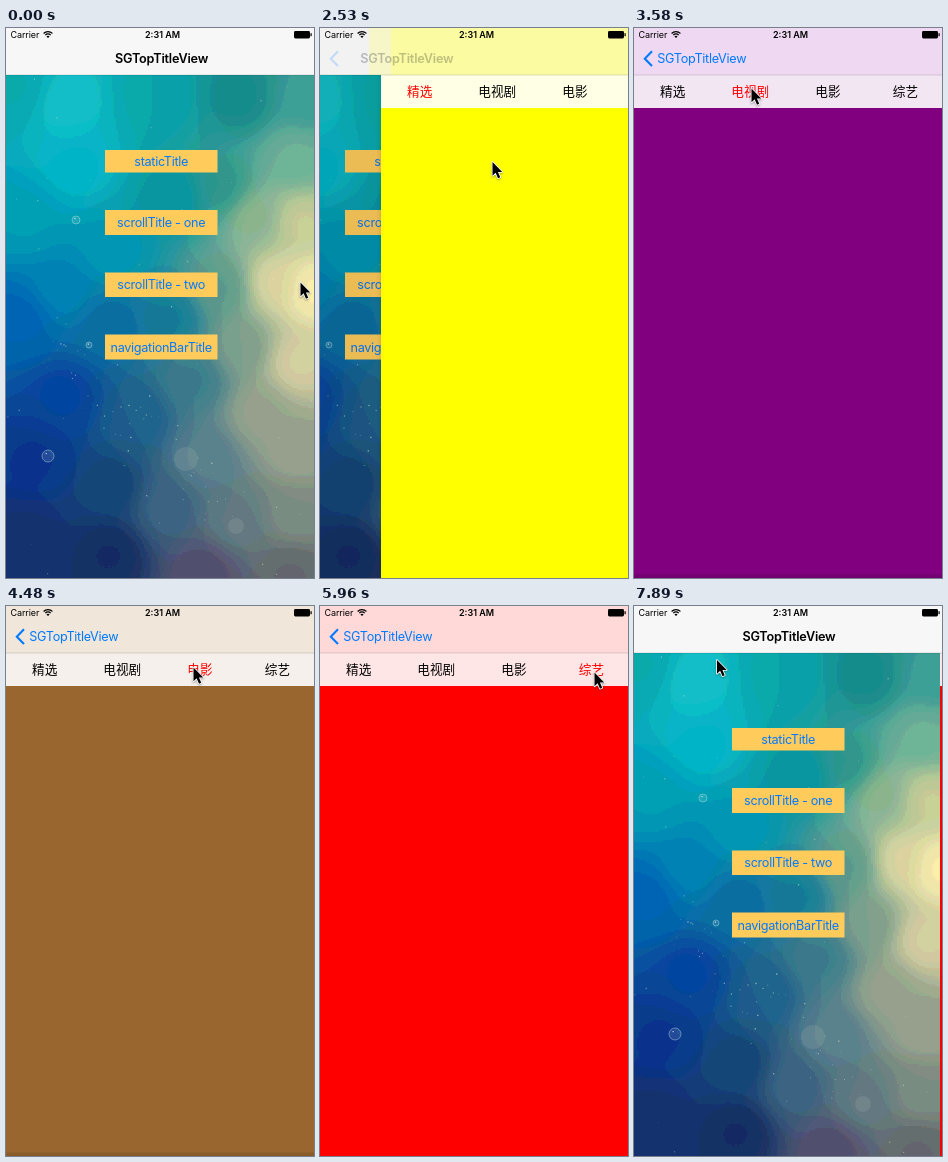
Write an HTML page with a canvas that moves like this. It is 308 px wide and 550 px high and loops after 8000 ms.

```html
<!DOCTYPE html>
<html lang="zh">
<head>
<meta charset="utf-8">
<title>SGTopTitleView</title>
<style>
html, body { margin: 0; width: 308px; height: 550px; overflow: hidden; background: #fff; }
canvas { display: block; width: 308px; height: 550px; }
</style>
</head>
<body>
<canvas id="stage"></canvas>
<script>
const W = 308, H = 550, LOOP = 8000, BAR = 47, TABS = 80;
const SANS = 'Inter, Roboto, sans-serif';
const CJK = '"Noto Sans CJK SC", "Noto Sans CJK", sans-serif';
const BLUE = '#007aff';
const dpr = window.devicePixelRatio || 1;

const clamp = v => Math.max(0, Math.min(1, v));
const mix = (a, b, p) => a + (b - a) * p;
const smooth = p => p * p * (3 - 2 * p);

function makeCanvas(el) {
  el.width = W * dpr;
  el.height = H * dpr;
  const c = el.getContext('2d');
  c.scale(dpr, dpr);
  return c;
}
const g = makeCanvas(document.getElementById('stage'));

const bursts = [
  [0, 0, 1], [1350, 2090, 6], [2380, 3280, 7], [3580, 4480, 7],
  [4770, 5510, 6], [5960, 5960, 1], [6560, 7150, 5], [7590, 7890, 3]
];
function snap(t) {
  let s = 0;
  for (const [from, to, n] of bursts) {
    if (t < from) break;
    const gap = n > 1 ? (to - from) / (n - 1) : 1;
    s = from + Math.min(n - 1, Math.floor((t - from + 2) / gap)) * gap;
  }
  return s;
}

// Pointer moves: start, end, target x, target y, dip.
const moves = [
  [1200, 2090, 172.5, 134, 0],
  [2530, 3280, 117.5, 60.5, 0],
  [3580, 4330, 187.5, 61.5, 0],
  [4620, 5510, 274.5, 66.5, 9],
  [6410, 7150, 41, 29, 0],
  [7590, 7890, 83, 54, 0]
];
function pointerAt(t) {
  let x = 294.5, y = 254.5;
  for (const [a, b, tx, ty, dip] of moves) {
    const p = smooth(clamp((t - a) / (b - a)));
    x = mix(x, tx, p);
    y = mix(y, ty, p) + dip * Math.sin(Math.PI * p);
  }
  return [x, y];
}

const pages = [
  { from: 0, fill: '#ffff00', bar: '#fbfba2', tab: 0 },
  { from: 3580, fill: '#800080', bar: '#efd9f2', tab: 1 },
  { from: 4480, fill: '#99662f', bar: '#f0e6da', tab: 2 },
  { from: 5960, fill: '#ff0000', bar: '#ffd9d8', tab: 3 }
];
const tabs = ['精选', '电视剧', '电影', '综艺'];
const buttons = [
  ['staticTitle', 122, 22.5], ['scrollTitle - one', 182, 25],
  ['scrollTitle - two', 244.5, 24.5], ['navigationBarTitle', 306.5, 25]
];

// Critically damped slide, as used by the navigation controller.
function slide(ms) {
  const k = 0.0195 * Math.max(0, ms);
  return 1 - (1 + k) * Math.exp(-k);
}
const PUSH = 2376, POP = 7524;

function text(c, str, x, y, font, color, align = 'left', track = 0) {
  c.font = font;
  c.fillStyle = color;
  c.textAlign = align;
  c.letterSpacing = track + 'px';
  c.fillText(str, x, y);
}

function random(seed) {
  return () => (seed = (seed * 16807) % 2147483647) / 2147483647;
}

// Wallpaper colours at a few points; everything between is blended.
const hues = [
  [10, 60, '#08a5ae'], [60, 75, '#12c0c8'], [70, 135, '#04b8c8'], [150, 70, '#06a5ac'],
  [235, 70, '#168c8e'], [300, 70, '#3a9c92'], [20, 190, '#009cb8'], [110, 220, '#009ab2'],
  [170, 170, '#04989f'], [215, 160, '#2c988e'], [290, 130, '#6cb094'], [250, 190, '#8db490'],
  [295, 195, '#c8ce9a'], [305, 262, '#faeeb0'], [270, 255, '#dcd69e'], [215, 260, '#5c9a8c'],
  [55, 260, '#0084b2'], [15, 290, '#0064b0'], [105, 300, '#0a6ca2'], [165, 290, '#147c98'],
  [235, 320, '#7d9e8a'], [292, 335, '#d8cfa0'], [255, 385, '#96a48c'], [190, 350, '#3c7c8c'],
  [60, 370, '#04449c'], [130, 390, '#1a5f88'], [30, 430, '#05368f'], [105, 460, '#124478'],
  [200, 430, '#587f8c'], [290, 420, '#98a28a'], [160, 480, '#3a6480'], [230, 495, '#607c80'],
  [290, 490, '#7d8c80'], [20, 510, '#143070'], [105, 525, '#142c62'], [200, 542, '#544f70'],
  [285, 542, '#62686c']
].map(([x, y, hex]) => [x, y, [1, 3, 5].map(i => parseInt(hex.slice(i, i + 2), 16))]);

function hueAt(x, y) {
  const sum = [0, 0, 0];
  let total = 0;
  for (const [hx, hy, rgb] of hues) {
    const d = (x - hx) ** 2 + (y - hy) ** 2;
    const w = 1 / (d + 350) ** 2;
    total += w;
    for (let i = 0; i < 3; i++) sum[i] += rgb[i] * w;
  }
  return sum.map(v => Math.round(v / total / 10) * 10);
}

function makeWallpaper() {
  const el = document.createElement('canvas');
  const c = makeCanvas(el);
  for (let y = BAR - 1; y < H; y += 2)
    for (let x = 0; x < W; x += 2) {
      c.fillStyle = `rgb(${hueAt(x + 1, y + 1)})`;
      c.fillRect(x, y, 2, 2);
    }

  const rnd = random(417);
  for (let i = 0; i < 110; i++) {
    const u = rnd(), v = rnd(), band = i < 55;
    const x = band ? 40 + u * 190 : u * W;
    const y = band ? 310 + u * 170 + (v - 0.5) * 80 : 50 + v * 500;
    const s = 0.6 + rnd() * 0.8;
    c.fillStyle = `rgba(225,235,205,${0.2 + rnd() * 0.45})`;
    c.fillRect(x, y, s, s);
  }
  for (const [x, y, r] of [[70, 192, 4], [83, 317, 3], [42, 428, 6]]) {
    c.beginPath();
    c.arc(x, y, r, 0, 7);
    c.fillStyle = 'rgba(190,225,235,.14)';
    c.fill();
    c.strokeStyle = 'rgba(190,220,225,.5)';
    c.lineWidth = 0.9;
    c.stroke();
    c.fillStyle = 'rgba(255,255,255,.75)';
    c.fillRect(x - r * 0.4, y - r * 0.5, 1.2, 1.2);
  }
  for (const [x, y, r] of [[180, 431, 12], [230, 498, 8]]) {
    c.beginPath();
    c.arc(x, y, r, 0, 7);
    c.fillStyle = 'rgba(160,180,170,.2)';
    c.fill();
  }
  return el;
}
const wallpaper = makeWallpaper();

function drawHome(p) {
  g.save();
  g.translate(-Math.round(0.3 * W * p), 0);
  g.drawImage(wallpaper, 0, 0, W, H);
  for (const [label, y, h] of buttons) {
    g.fillStyle = '#ffcb5b';
    g.fillRect(99, y, 112.5, h);
    text(g, label, 155.2, y + h / 2 + 4.6, '12.65px ' + SANS, BLUE, 'center', -0.3);
  }
  g.restore();
  g.fillStyle = `rgba(0,0,0,${0.1 * p})`;
  g.fillRect(0, 0, W, H);
}

function drawPage(page, x, p) {
  if (x > 0) {
    const shadow = g.createLinearGradient(x - 5, 0, x, 0);
    shadow.addColorStop(0, 'rgba(0,0,0,0)');
    shadow.addColorStop(1, `rgba(0,0,0,${0.08 * p})`);
    g.fillStyle = shadow;
    g.fillRect(x - 5, BAR, 5, H);
  }
  g.fillStyle = page.fill;
  g.fillRect(x, 0, W, H);
  if (page.tab === 1 || page.tab === 2) {
    g.fillStyle = 'rgba(0,0,0,.1)';
    g.fillRect(x, H - 3.5, W, 4);
  }
  g.fillStyle = 'rgba(255,255,255,.9)';
  g.fillRect(x, BAR, W, TABS - BAR);
  tabs.forEach((name, i) => text(g, name, x + 38.7 + 77.6 * i, 68, '12.65px ' + CJK,
    i === page.tab ? '#ff0000' : '#000', 'center'));
}

function drawBar(page, x, p, fade) {
  const shade = Math.round(247 - 6 * p);
  g.fillStyle = `rgb(${shade},${shade},${shade})`;
  g.fillRect(0, 0, W, BAR);
  g.fillStyle = page.bar;
  if (x <= 0) g.fillRect(0, 0, W, BAR);
  else if (p > 0.01) {
    // The blurred page edge shows as one half-tone band.
    g.globalAlpha = 0.5;
    g.fillRect(x - 12, 0, 22, BAR);
    g.globalAlpha = 1;
    g.fillRect(x + 10, 0, W, BAR);
  }
  g.fillStyle = 'rgba(0,0,0,.22)';
  g.fillRect(0, BAR - 0.3, W, 0.6);

  const tx = mix(109, 23.3, p);
  if (fade.title > 0) {
    g.globalAlpha = fade.title;
    text(g, 'SGTopTitleView', tx, 35, '600 12.65px ' + SANS, '#000', 'left', -0.2);
  }
  if (fade.back > 0) {
    g.globalAlpha = fade.back;
    text(g, 'SGTopTitleView', tx, 35, '12.65px ' + SANS, BLUE, 'left', -0.3);
  }
  if (fade.arrow > 0) {
    g.globalAlpha = fade.arrow;
    g.strokeStyle = BLUE;
    g.lineWidth = 2.1;
    g.beginPath();
    g.moveTo(18, 23.3);
    g.lineTo(10.8, 30.7);
    g.lineTo(18, 38.1);
    g.stroke();
  }
  g.globalAlpha = 1;
}

function drawStatus() {
  text(g, 'Carrier', 4.5, 10.2, '9px ' + SANS, '#000', 'left', -0.1);
  text(g, '2:31 AM', 156.5, 10.2, '600 9px ' + SANS, '#000', 'center');
  g.fillStyle = g.strokeStyle = '#000';
  g.lineWidth = 1.3;
  for (const r of [3.8, 6.2]) {
    g.beginPath();
    g.arc(42, 9.8, r, -2.36, -0.78);
    g.stroke();
  }
  g.beginPath();
  g.moveTo(42, 10);
  g.arc(42, 10, 2.2, -2.36, -0.78);
  g.fill();
  g.beginPath();
  g.roundRect(288, 3, 16, 7.4, 1.4);
  g.fill();
  g.fillRect(304.5, 5.2, 1.2, 3);
}

function drawPointer(x, y) {
  g.save();
  g.translate(x, y);
  g.scale(0.92, 0.92);
  g.beginPath();
  for (const [px, py] of [[0, 0], [0, 15], [3.4, 11.8], [6, 17.6], [8.4, 16.5], [5.9, 10.9], [10.6, 10.9]])
    g.lineTo(px, py);
  g.closePath();
  g.shadowColor = 'rgba(0,0,0,.35)';
  g.shadowBlur = 2 * dpr;
  g.shadowOffsetY = dpr;
  g.strokeStyle = '#fff';
  g.lineWidth = 1.8;
  g.lineJoin = 'round';
  g.stroke();
  g.shadowColor = 'transparent';
  g.fillStyle = '#000';
  g.fill();
  g.restore();
}

function draw(t) {
  const popping = t >= POP;
  const ms = t - (popping ? POP : PUSH);
  const p = popping ? 1 - slide(ms) : slide(ms);
  const x = p > 0.997 ? 0 : Math.round(W * (1 - p));
  const page = pages.filter(q => t >= q.from).pop();
  const back = popping ? clamp(1 - ms / 120) : clamp((ms - 150) / 200);
  const fade = {
    title: popping ? clamp((ms - 120) / 150) : clamp(1 - Math.max(0, ms) / 200),
    back,
    arrow: popping ? back * back * 0.6 : clamp((ms - 115) / 200)
  };
  if (x > 0) drawHome(p);
  if (p > 0) drawPage(page, x, p);
  drawBar(page, x, p, fade);
  drawStatus();
  drawPointer(...pointerAt(t));
}

const start = performance.now();
function tick() {
  draw(snap((performance.now() - start) % LOOP));
  requestAnimationFrame(tick);
}
tick();
</script>
</body>
</html>
```
